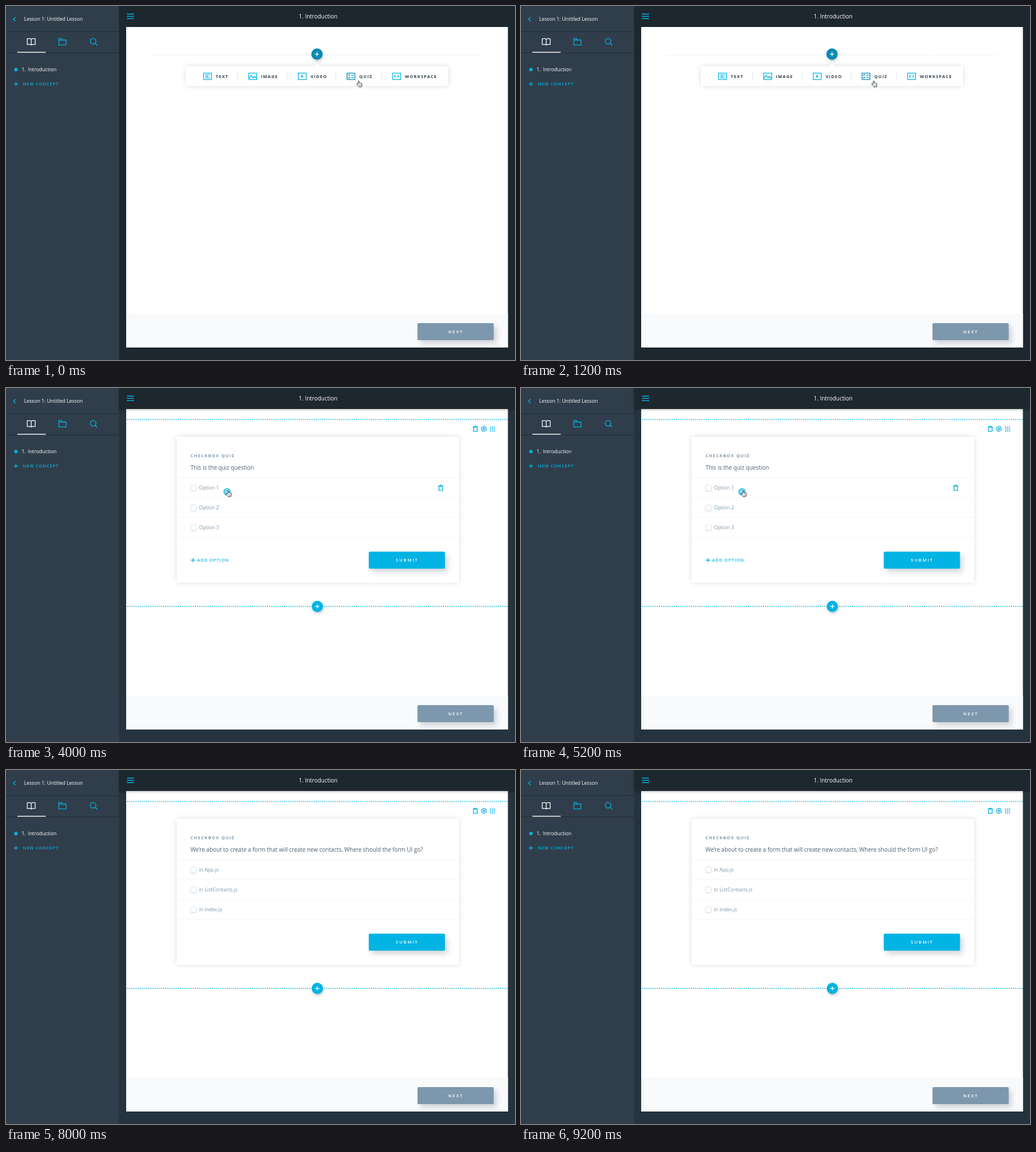
An HTML page that plays this animation: 898 px wide and 624 px high, repeating every 10 s.

```html
<!DOCTYPE html>
<html lang="en">
<head>
<meta charset="utf-8">
<title>Lesson editor</title>
<style>
  html, body { margin: 0; width: 100%; height: 100%; overflow: hidden; background: #1d272e; }
  svg { display: block; width: 898px; height: 624px; }
  text { font-family: "Open Sans", sans-serif; white-space: pre; }
  .line { fill: none; stroke: #02b3e4; stroke-width: 1.3; }
  .card { fill: #fff; filter: drop-shadow(0 0 4px rgba(46, 61, 73, .18)); }
  .button { filter: drop-shadow(5px 6px 5px rgba(46, 61, 73, .2)); }
  .round { filter: drop-shadow(1px 3px 2px rgba(46, 61, 73, .25)); }
  .box { fill: #fff; stroke: #dbe2e8; stroke-width: .9; filter: drop-shadow(0 1px 1px rgba(46, 61, 73, .12)); }
  .frame { fill: #fff; stroke: #dbe2e8; stroke-width: 1; }
</style>
</head>
<body>
<svg id="stage" viewBox="0 0 898 624" xmlns="http://www.w3.org/2000/svg"></svg>
<script>
const CYAN = '#02b3e4', DEEP = '#078ab2', STEEL = '#7d97ad', INK = '#2e3d49', SLATE = '#4f5d6b';
const S = 6.24, M = 7.48, L = 8.73, XL = 9.98;   // type sizes
const STEP = 2000, STEPS = 5;

// y is the middle of the capitals
const text = (x, y, size, fill, str, more = '') =>
  `<text x="${x}" y="${(y + size * .36).toFixed(2)}" font-size="${size}" fill="${fill}" ${more}>${str}</text>`;
const caps = (x, y, fill, str, gap, weight = 700) =>
  text(x, y, M, fill, str, `font-weight="${weight}" letter-spacing="${gap}"`);
const rect = (x, y, w, h, fill, more = '') =>
  `<rect x="${x}" y="${y}" width="${w}" height="${h}" fill="${fill}" ${more}/>`;
const shape = (cls, x, y, w, h, r = 1) =>
  `<rect class="${cls}" x="${x}" y="${y}" width="${w}" height="${h}" rx="${r}"/>`;
const line = (d, more = '') => `<path class="line" d="${d}" ${more}/>`;
const at = (x, y, body) => `<g transform="translate(${x} ${y})">${body}</g>`;
const on = (steps, ...parts) => `<g data-on="${steps}">${parts.join('')}</g>`;

const plus = (x, y, r, color) =>
  line(`M${x - r} ${y}h${2 * r}M${x} ${y - r}v${2 * r}`, `style="stroke:${color}"`);
const addButton = (x, y, color) =>
  `<circle class="round" cx="${x}" cy="${y}" r="10" fill="${color}"/>` + plus(x, y, 3.6, '#fff');
const dots = (x1, x2, y, w, color) =>
  `<path d="M${x1} ${y}H${x2}" stroke="${color}" stroke-width="${w}" stroke-linecap="round" stroke-dasharray="0 3.74"/>`;
const button = (x, y, color, label, labelX) =>
  rect(x, y, 134.5, 30, color, 'rx="2" class="button"') + caps(labelX, y + 15, '#fff', label, 2, 600);

const trash = (x, y) => at(x, y,
  line('M-4.3 -3.2H4.3M-1.5 -3.4V-4.6H1.5V-3.4M-3.2 -3V4.4H3.2V-3', 'style="stroke-width:1.4"'));
const hand = (x, y) => at(x, y,
  `<path d="M3.2 6.6V1.6a1 1 0 0 1 2 0V4.6a.9 .9 0 0 1 1.7 .1a.9 .9 0 0 1 1.6 .3a.8 .8 0 0 1 1.5 .5v2.6
   c0 1.4-.9 1.6-.9 3H4.3c0-1.2-2.4-2.6-3.6-4.6c-.4-.9 .8-1.4 1.4-.8z" fill="#fff" stroke="#222b32" stroke-width=".9"/>
   <path d="M5.5 7.2v2M6.9 7.2v2M8.3 7.2v2" stroke="#222b32" stroke-width=".6"/>`);

function gear(x, y) {
  const pts = [];
  for (let i = 0; i < 16; i++) {
    const a = (i + .5) * Math.PI / 8, r = i % 4 < 2 ? 4.6 : 3.9;
    pts.push(`${(r * Math.cos(a)).toFixed(2)},${(r * Math.sin(a)).toFixed(2)}`);
  }
  return at(x, y, `<polygon class="line" points="${pts.join(' ')}"/><circle class="line" r="1.5"/>`);
}

function grip(x, y) {
  let out = '';
  for (let i = 0; i < 9; i++)
    out += rect(x - 4.4 + (i % 3) * 3.4, y - 4.4 + Math.floor(i / 3) * 3.4, 2, 2, CYAN, 'rx=".6"');
  return out;
}

function sidebar() {
  return rect(0, 0, 199.5, 624, '#303e4b') +
    line('M16.8 19.8L13.2 23.3L16.8 26.8') +
    text(32, 23, L, '#fff', 'Lesson 1: Untitled Lesson') +
    rect(0, 44.6, 199.5, 1, '#1f2a33') + rect(0, 82, 199.5, 1, '#1f2a33') +
    rect(20, 80.8, 50, 1.5, '#fff') +
    at(44.5, 63, line('M0 -4.5C-2 -5.9 -4.6 -5.9 -7 -5.2V5C-4.6 4.3 -2 4.4 0 5.8C2 4.4 4.6 4.3 7 5V-5.2C4.6 -5.9 2 -5.9 0 -4.5V5.8',
      'style="stroke:#fff"')) +
    at(99.5, 63, line('M-6.3 5.6V-5.6H-1.6L-.2 -3H6.3V5.6ZM-6.3 -2.9H0')) +
    at(154.5, 63, '<circle class="line" cx="-.8" cy="-.8" r="5"/>' + line('M2.8 2.8L6.2 6.2')) +
    `<circle cx="17.5" cy="112" r="3.1" fill="${CYAN}"/>` +
    text(27.5, 112.3, L, '#fff', '1.') + text(38.8, 112.3, L, '#fff', 'Introduction') +
    plus(17.5, 137.5, 3.8, CYAN) + caps(29.7, 137.6, CYAN, 'NEW CONCEPT', .95, 600);
}

function header(more) {
  return rect(199.5, 0, 698.5, 37, '#1d272e', more) +
    line('M213.3 14.2h12.6M213.3 18.2h12.6M213.3 22.2h12.6', 'style="stroke-width:1.5"') +
    text(550.7, 18.4, XL, '#fff', '1. Introduction', 'text-anchor="middle"');
}

const page = () =>
  rect(212, 37, 673.5, 565, '#fff') + rect(212, 542, 673.5, 60, '#f9fafc') +
  button(726, 559, STEEL, 'NEXT', 780.2);

function menu() {
  const frame = 'M-7 -5.7H7V5.7H-7Z';
  const items = [
    [355.5, 370, 'TEXT', 'M-4 -2.7H4M-4 0H1.5M-4 2.7H4'],
    [435.3, 449.8, 'IMAGE', 'M-6.6 4L-2.8 -2L.8 3L3.2 0L6.6 4.2'],
    [522.6, 537.4, 'VIDEO', 'M-1 -1.6L1.4 0L-1 1.6Z'],
    [608.6, 623.3, 'QUIZ', 'M-5 -2.6L-3.8 -1.4L-1.6 -3.8M-5 2.2L-3.8 3.4L-1.6 1M.6 -2.2H5M.6 2.2H5'],
    [689, 703.8, 'WORKSPACE', 'M-1.6 -2.4L-4 0L-1.6 2.4M1.6 -2.4L4 0L1.6 2.4']
  ];
  const list = items.map(([x, tx, label, d]) =>
    at(x, 124, line(frame + d, label === 'QUIZ' ? `style="stroke:${DEEP}"` : '')) +
    caps(tx, 124, INK, label, 1.28)).join('');
  const bars = [408.5, 496, 582, 662.3].map(x => rect(x - .4, 116, .8, 15, '#d5dde4')).join('');
  return '<path class="card" d="M319 106H543.7L548.7 101L553.7 106H778a2 2 0 0 1 2 2V139a2 2 0 0 1-2 2H319a2 2 0 0 1-2-2V108a2 2 0 0 1 2-2Z"/>' +
    bars + list;
}

function tick(x, y, checked) {
  return checked
    ? rect(x, y - 3.1, 6.2, 6.2, CYAN, 'rx="1"') + line(`M${x + 1.5} ${y}l1.2 1.3l2-2.5`, 'style="stroke:#fff;stroke-width:.9"')
    : shape('box', x + .4, y - 2.7, 5.4, 5.4);
}

function drawer() {
  const titles = [['CHECKBOX', 717.8, 66.5], ['RADIOBOX', 719, 194], ['MATCHING', 718.4, 321.3],
    ['CODE GRADED', 717.8, 448.6], ['FILL IN THE BLANK', 718, 575.8]];
  const green = s => `<tspan fill="#13c166">'${s}'</tspan>`;
  const albums = [['Odrin', '47', ' },'], ['Talvo', 'Reefs', '},'], ['Sorelie', 'Plumtide', '}']];
  return rect(698.3, 0, 199.7, 624, '#f9fafc') +
    text(717.5, 27.4, 11.22, STEEL, 'Select a quiz type', 'font-weight="600"') +
    line('M865.8 22.8l8.6 8.6m0-8.6l-8.6 8.6', 'style="stroke:#6d879e"') +
    titles.map(([s, x, y]) => caps(x, y, '#435160', s, 1.4)).join('') +
    shape('card', 717.5, 79, 160, 87) +
    text(732.6, 98.3, S, SLATE, 'This is the question') +
    [116, 130, 143.6].map((y, i) => tick(732.8, y, i !== 1) + text(743.8, y + .3, S, STEEL, `Option ${i + 1}`)).join('') +
    [206.2, 333.5, 460.7, 588].map(y => shape('frame', 718.2, y, 159.6, 87)).join('') +
    text(733.2, 229.3, S, SLATE, 'This is the question') +
    [247.3, 261, 274.7].map((y, i) => {
      const sel = i === 1;
      return `<circle cx="736.5" cy="${y}" r="2.7" fill="#fff" stroke="${sel ? CYAN : '#d5dde4'}" stroke-width="${sel ? 1.4 : .8}"/>` +
        text(744.4, y + .2, S, sel ? CYAN : STEEL, sel ? 'Radio BTN Selected' : 'Radio BTN Normal');
    }).join('') +
    text(733.2, 347.3, S, SLATE, 'Which animal eats which fruit ?') +
    rect(733.2, 357.6, 38.7, 12.6, '#02ccba', 'rx="1"') + text(752.5, 364.2, S, '#fff', 'Monkey', 'text-anchor="middle"') +
    rect(775, 357.6, 38.7, 12.6, CYAN, 'rx="1"') + text(794.3, 364.2, S, '#fff', 'Cat', 'text-anchor="middle"') +
    rect(718.8, 380, 158.4, 14.4, '#f7f9fb') +
    text(733.2, 387.3, S, STEEL, 'Fish') + text(733.2, 402.3, S, STEEL, 'Bananas') +
    text(739, 485.2, S, SLATE, 'const musicData = [') +
    albums.map(([who, name, end], i) =>
      text(745.2, 495.2 + i * 10, S, SLATE, `{ artist: ${green(who)}, name: ${green(name)}${end}`)).join('') +
    text(739, 525.3, S, SLATE, '];') +
    text(733.2, 610.2, S, SLATE, 'Refelect what you have learned.');
}

const rows = [176, 211, 246];
const options = list => rows.map((y, i) => text(340.4, y + .1, L, STEEL, list[i])).join('');
const question = s => text(325.4, 140.3, XL, SLATE, s);

const quiz = () =>
  dots(214.5, 885, 55.5, 1.8, CYAN) +
  trash(828, 72) + gear(843, 72) + grip(858.4, 72.3) +
  shape('card', 301, 86, 498.5, 257.3) +
  caps(325.4, 119, STEEL, 'CHECKBOX QUIZ', 1.38) +
  [158.4, 193.2, 228.1, 263].map(y => rect(301, y - .4, 498.5, .8, '#f0f3f6')).join('') +
  rows.map(y => shape('box', 325.9, y - 4.8, 9.8, 9.8, 1.5)).join('') +
  button(640, 288.5, CYAN, 'SUBMIT', 687.8) +
  dots(214.5, 885, 385, 1.8, CYAN) + addButton(549.3, 385, CYAN);

const draft = () =>
  question('This is the quiz question') + options(['Option 1', 'Option 2', 'Option 3']) +
  trash(767, 176) + plus(330, 303.5, 3.8, CYAN) + caps(337.3, 303.6, CYAN, 'ADD OPTION', .97, 600);

const stage = document.getElementById('stage');
stage.innerHTML = [
  rect(199, 0, 699, 624, '#1d272e'),
  on('234', rect(199, 0, 699, 624, '#25333e')),
  sidebar(),
  page(),
  on('01', header(''), dots(257.5, 840, 86, 1.2, '#b9c3cc')),
  on('0', addButton(548.7, 84.8, DEEP), menu(), hand(618, 131.5)),
  on('1', addButton(548.7, 84.8, CYAN),
    text(548.7, 111.3, L, STEEL, 'You have no atoms yet. Add one!', 'font-style="italic" text-anchor="middle"'),
    rect(0, 0, 898, 624, '#253642', 'opacity=".68"'),
    drawer(), hand(823, 147)),
  on('234', header('style="filter:drop-shadow(0 1px 2px rgba(0,0,0,.3))"'), quiz()),
  on('23', draft()),
  on('2', `<circle cx="390" cy="183" r="5.6" fill="#bfeaf7" stroke="${CYAN}" stroke-width="1.4"/>`,
    `<circle cx="390" cy="183" r="3.4" fill="none" stroke="${CYAN}"/>`, hand(387.5, 180.5)),
  on('3', rect(377.4, 171.6, 1, 9.6, INK),
    line('M402.3 181q2.2 0 2.2 1.2q0-1.2 2.2-1.2M404.5 182v6.4M402.3 189.2q2.2 0 2.2-1.2q0 1.2 2.2 1.2M403.4 185.9h2.2',
      'style="stroke:#222b32;stroke-width:.9"')),
  on('4', question('We’re about to create a form that will create new contacts, Where should the form UI go?'),
    options(['in App.js', 'in ListContacts.js', 'in index.js']))
].join('');

const layers = [...stage.querySelectorAll('[data-on]')];
const start = performance.now();
let shown = -1;

function draw() {
  const step = Math.floor((performance.now() - start) / STEP) % STEPS;
  if (step !== shown) {
    shown = step;
    for (const g of layers) g.style.display = g.dataset.on.includes(step) ? '' : 'none';
  }
  requestAnimationFrame(draw);
}
draw();
</script>
</body>
</html>
```
